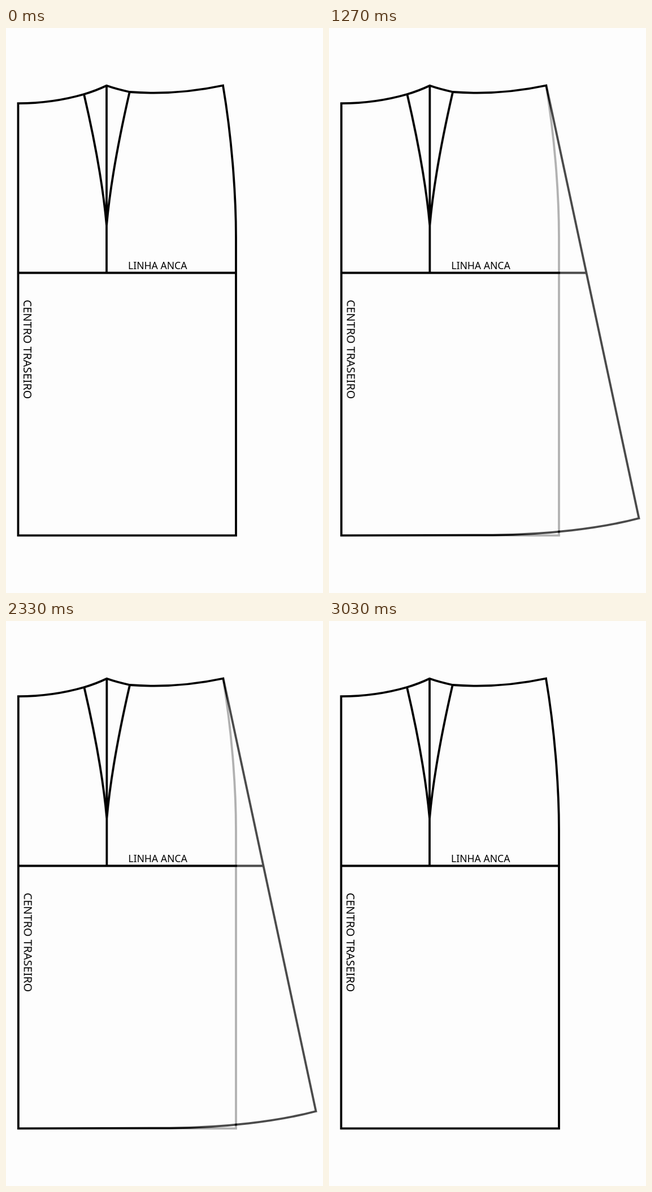
An HTML page that plays this animation: 561x998 px, repeating every 3.23 s.

```html
<!DOCTYPE html>
<html lang="pt">
<head>
<meta charset="utf-8">
<title>Molde de saia</title>
<style>
  html, body { margin: 0; height: 100%; overflow: hidden; background: #fdfdfd; }
  svg { display: block; width: 100%; height: 100%; }
  path { fill: none; stroke: #000; stroke-width: 3.8; }
  text { font-family: "Noto Sans", sans-serif; }
</style>
</head>
<body>
<svg viewBox="0 0 561 998">
  <defs>
    <g id="common">
      <path d="M138 117C155 190 171 270 178 349C185 270 201 190 218.7 113M178 102V432.5"/>
      <text x="216" y="426" font-size="17.6">LINHA ANCA</text>
      <text transform="translate(31 480) rotate(90)" font-size="19.85">CENTRO TRASEIRO</text>
    </g>
  </defs>
  <g>
    <use href="#common"/>
    <path d="M21.5 133.2C60 133 100 128 138 117C152 113 166 107.5 178 101.8C190 106 205 110 219 113
             C272 117 330 113 384 101.5C399 190 407 290 407 370V896.3H21.5ZM21.5 432.5H407"/>
  </g>
  <!-- Opaque layer: its opacity gives a true crossfade. -->
  <g id="flared" opacity="0">
    <rect width="561" height="998" fill="#fdfdfd"/>
    <use href="#common" x=".5"/>
    <path d="M22 133.2C60.5 133 100.5 128 138.5 117C152.5 113 166.5 107.5 178.5 101.8C190.5 106 205.5 110 219.5 113
             C272.5 117 330.5 113 384.5 101.5L548.5 866C480 884 385 895 290 895.6L22 896.3ZM22 432.5H455.5"/>
  </g>
</svg>
<script>
  const LOOP = 3230, FPS = 30;
  const flared = document.getElementById("flared");
  const clamp = v => Math.min(1, Math.max(0, v));
  const start = performance.now();

  function draw() {
    const t = (performance.now() - start) % LOOP;
    const step = Math.floor((t + 3.4) * FPS / 1000);
    const fadeIn = clamp((step - 14) / 34);
    const fadeOut = clamp((step - 61) / 30);
    flared.setAttribute("opacity", fadeIn - fadeOut);
    requestAnimationFrame(draw);
  }
  draw();
</script>
</body>
</html>
```
